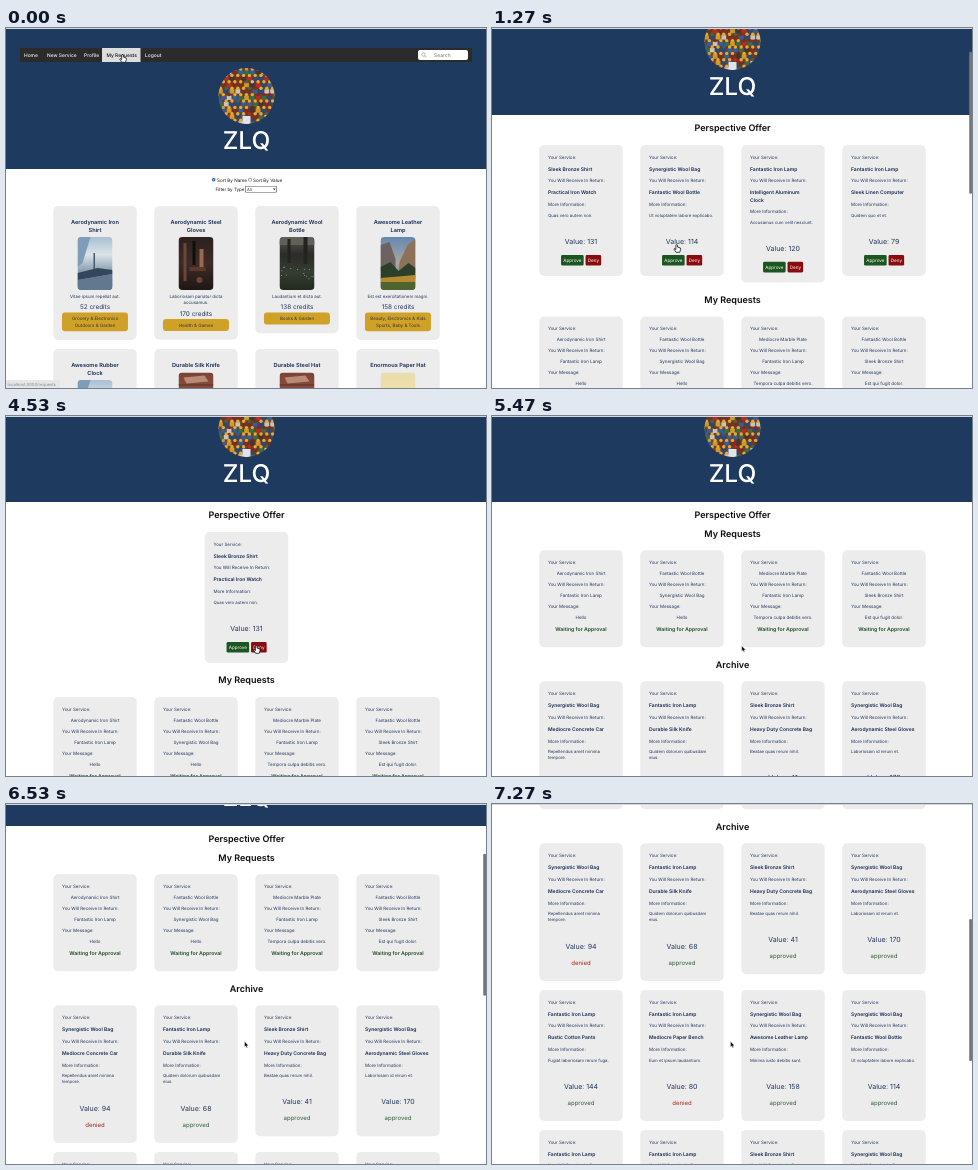
An HTML page with a canvas for the animation above (7340 ms loop, 480 by 360 pixels).

```html
<!DOCTYPE html>
<html lang="en">
<head>
<meta charset="utf-8">
<title>Service exchange</title>
<style>
html, body { margin: 0; width: 100%; height: 100%; overflow: hidden; background: #fff; }
canvas { display: block; width: 480px; height: 360px; }
</style>
</head>
<body>
<canvas id="stage"></canvas>
<script>
const W = 480, H = 360, LOOP = 7340, STEP = 200 / 3;
const canvas = document.getElementById('stage');
const ctx = canvas.getContext('2d');
const dpr = window.devicePixelRatio || 1;
canvas.width = W * dpr;
canvas.height = H * dpr;
ctx.textRendering = 'geometricPrecision';

const NAVY = '#1e3a5f', INK = '#22345c', DARK = '#142850', CARD = '#ececec';
const GREEN = '#1b5520', RED = '#8b0a0f', GOLD = '#d0a127';
const CARD_W = 83.5, PITCH = 101;

// ---------- content ----------
const offer = (give, get, info, value, status) => ({ give, get: [].concat(get), info: [].concat(info), value, status });

const offers = [
  offer('Sleek Bronze Shirt', 'Practical Iron Watch', 'Quas vero autem non.', 131),
  offer('Synergistic Wool Bag', 'Fantastic Wool Bottle', 'Ut voluptatem labore explicabo.', 114),
  offer('Fantastic Iron Lamp', ['Intelligent Aluminum', 'Clock'], 'Accusamus cum velit nesciunt.', 120),
  offer('Fantastic Iron Lamp', 'Sleek Linen Computer', 'Quidem quo et et.', 79)
];

const requests = [
  ['Aerodynamic Iron Shirt', 'Fantastic Iron Lamp', 'Hello'],
  ['Fantastic Wool Bottle', 'Synergistic Wool Bag', 'Hello'],
  ['Mediocre Marble Plate', 'Fantastic Iron Lamp', 'Tempora culpa debitis vero.'],
  ['Fantastic Wool Bottle', 'Sleek Bronze Shirt', 'Est qui fugit dolor.']
];

const archive = [
  [
    offer('Synergistic Wool Bag', 'Mediocre Concrete Car', ['Repellendus amet minima', 'tempore.'], 94, 'denied'),
    offer('Fantastic Iron Lamp', 'Durable Silk Knife', ['Quidem dolorum quibusdam', 'eius.'], 68, 'approved'),
    offer('Sleek Bronze Shirt', 'Heavy Duty Concrete Bag', 'Beatae quas rerum nihil.', 41, 'approved'),
    offer('Synergistic Wool Bag', 'Aerodynamic Steel Gloves', 'Laboriosam id rerum et.', 170, 'approved')
  ],
  [
    offer('Fantastic Iron Lamp', 'Rustic Cotton Pants', 'Fugiat laboriosam rerum fuga.', 144, 'approved'),
    offer('Fantastic Iron Lamp', 'Mediocre Paper Bench', 'Eum et ipsum laudantium.', 80, 'denied'),
    offer('Synergistic Wool Bag', 'Awesome Leather Lamp', 'Minima iusto debitis sunt.', 158, 'approved'),
    offer('Synergistic Wool Bag', 'Fantastic Wool Bottle', 'Ut voluptatem labore explicabo.', 114, 'approved')
  ],
  [
    offer('Fantastic Iron Lamp', 'Practical Iron Watch', 'Quas vero autem non.', 131, 'denied'),
    offer('Fantastic Iron Lamp', 'Sleek Linen Computer', 'Quidem quo et et.', 79, 'denied'),
    offer('Sleek Bronze Shirt', 'Practical Iron Watch', 'Quas vero autem non.', 131, 'denied'),
    offer('Synergistic Wool Bag', 'Fantastic Wool Bottle', 'Ut voluptatem labore explicabo.', 114, 'approved')
  ]
];

const services = [
  { title: ['Aerodynamic Iron', 'Shirt'], pic: carPic, text: ['Vitae ipsum repellat aut.'], cost: 52, tags: ['Grocery & Electronics', 'Outdoors & Garden'] },
  { title: ['Aerodynamic Steel', 'Gloves'], pic: toolPic, text: ['Laboriosam pariatur dicta', 'accusamus.'], cost: 170, tags: ['Health & Games'] },
  { title: ['Aerodynamic Wool', 'Bottle'], pic: meadowPic, text: ['Laudantium et dicta aut.'], cost: 138, tags: ['Books & Garden'] },
  { title: ['Awesome Leather', 'Lamp'], pic: cliffPic, text: ['Est est exercitationem magni.'], cost: 158, tags: ['Beauty, Electronics & Kids', 'Sports, Baby & Tools'] },
  { title: ['Awesome Rubber', 'Clock'], pic: carPic },
  { title: ['Durable Silk Knife'], pic: brickPic },
  { title: ['Durable Steel Hat'], pic: brickPic },
  { title: ['Enormous Paper Hat'], pic: sunPic }
];

// ---------- drawing helpers ----------
function text(str, x, y, size, color = INK, weight = 400, align = 'left') {
  ctx.font = `${weight} ${size}px Inter, "Open Sans", sans-serif`;
  ctx.textAlign = align;
  ctx.textBaseline = 'middle';
  ctx.fillStyle = color;
  ctx.fillText(str, x, y + size * 0.07);
}
const centered = (str, x, y, size, color, weight) => text(str, x, y, size, color, weight, 'center');

function rect(x, y, w, h, color) {
  ctx.fillStyle = color;
  ctx.fillRect(x, y, w, h);
}

function roundPath(x, y, w, h, r) {
  ctx.beginPath();
  ctx.moveTo(x + r, y);
  ctx.arcTo(x + w, y, x + w, y + h, r);
  ctx.arcTo(x + w, y + h, x, y + h, r);
  ctx.arcTo(x, y + h, x, y, r);
  ctx.arcTo(x, y, x + w, y, r);
  ctx.closePath();
}

function box(x, y, w, h, r, color) {
  roundPath(x, y, w, h, r);
  ctx.fillStyle = color;
  ctx.fill();
}

function disc(x, y, r, color) {
  ctx.beginPath();
  ctx.arc(x, y, r, 0, Math.PI * 2);
  ctx.fillStyle = color;
  ctx.fill();
}

function poly(color, ...p) {
  ctx.beginPath();
  for (let i = 0; i < p.length; i += 2) ctx.lineTo(p[i], p[i + 1]);
  ctx.closePath();
  ctx.fillStyle = color;
  ctx.fill();
}

function fade(h, ...colors) {
  const g = ctx.createLinearGradient(0, 0, 0, h);
  colors.forEach((c, i) => g.addColorStop(i / (colors.length - 1), c));
  return g;
}

function random(seed) {
  return () => (seed = (seed * 16807) % 2147483647) / 2147483647;
}

// ---------- pictures, each 35 x 53 ----------
function carPic() {
  rect(0, 0, 35, 53, fade(53, '#a9bfd2', '#dbe4e8', '#8399ad', '#46586c'));
  poly('#7f9cb8', 0, 0, 13, 0, 5, 26, 0, 30);
  poly('#34465c', 0, 36, 20, 31, 35, 33, 35, 37, 0, 43);
  poly('#62788f', 0, 43, 35, 37, 35, 53, 0, 53);
  rect(16, 16, 1.5, 16, '#46596b');
}
function toolPic() {
  rect(0, 0, 35, 53, fade(53, '#2b211e', '#3d2c26', '#1f1715'));
  rect(5, 6, 3, 38, '#6d4634');
  rect(14, 4, 3, 24, '#120e0d');
  rect(21, 12, 4, 18, '#9a6a4f');
  rect(11, 30, 16, 4, '#5b3a2b');
  disc(21, 43, 3, '#6d4431');
}
function meadowPic() {
  rect(0, 0, 35, 53, fade(53, '#56554f', '#2c2b28', '#343d30', '#23291f'));
  rect(0, 0, 35, 8, '#625f58');
  rect(8, 2, 3, 24, '#242320');
  rect(24, 0, 4, 27, '#242320');
  const rnd = random(41);
  for (let i = 0; i < 16; i++) disc(rnd() * 35, 28 + rnd() * 14, 0.5, '#a3a69a');
}
function cliffPic() {
  rect(0, 0, 35, 53, fade(53, '#6787b0', '#a9a8a4', '#586a3a'));
  poly('#6d6260', 0, 8, 9, 5, 15, 22, 15, 34, 0, 34);
  poly('#8d7258', 35, 2, 27, 8, 19, 25, 18, 36, 35, 36);
  poly('#2c3f2b', 0, 30, 10, 25, 18, 34, 28, 26, 35, 31, 35, 42, 0, 42);
  poly('#b58a33', 0, 41, 35, 38, 35, 45, 0, 46);
  rect(0, 45, 35, 8, '#50652d');
}
function brickPic() {
  rect(0, 0, 35, 53, fade(53, '#7c4435', '#8f5240', '#5e3328'));
  poly('#b98a76', 5, 5, 26, 3, 30, 9, 8, 11);
  rect(0, 12, 35, 1, '#5b3128');
}
function sunPic() {
  rect(0, 0, 35, 53, fade(53, '#e9dcae', '#f2e3a6', '#d3b765'));
}

function crowdPic(x, y) {
  ctx.save();
  ctx.beginPath();
  ctx.arc(x, y, 28, 0, Math.PI * 2);
  ctx.clip();
  rect(x - 28, y - 28, 56, 56, '#6b3a2a');
  const rnd = random(977);
  const tones = ['#b92a20', '#2f5f9c', '#7b2e20', '#3c6b45', '#c9c4bb', '#4a342a', '#cf9a2a', '#274a78'];
  for (let row = 0; row < 9; row++) {
    for (let col = 0; col < 11; col++) {
      const px = x - 29 + col * 5.8 + (row % 2) * 2.9, py = y - 27 + row * 6.4;
      rect(px - 2.4, py + 1, 4.8, 4.4, tones[Math.floor(rnd() * 8)]);
      disc(px, py, 1.7, rnd() < 0.7 ? '#dfae36' : tones[Math.floor(rnd() * 8)]);
    }
  }
  rect(x - 4, y + 20, 8, 9, '#dfe4ec');
  ctx.restore();
}

// ---------- page parts ----------
const colX = (i, n = 4) => 240.5 - n * PITCH / 2 + 8.75 + i * PITCH;

function header(hover) {
  rect(0, 0, W, 141, NAVY);
  rect(14, 20, 452, 14, '#2b2b2b');
  if (hover) rect(96, 20, 38.5, 14, '#dddddd');
  [['Home', 18], ['New Service', 41], ['Profile', 78], ['My Requests', 100.5], ['Logout', 139]].forEach(([label, x], i) => {
    const lit = hover && i === 3;
    text(label, x, 27, 4.9, lit ? '#111' : '#f4f4f4', 500);
  });
  box(412, 22, 50, 10, 2, '#fff');
  ctx.strokeStyle = '#8a8a8a';
  ctx.lineWidth = 0.6;
  ctx.beginPath();
  ctx.arc(417.6, 26.6, 1.7, 0, Math.PI * 2);
  ctx.moveTo(418.8, 27.9);
  ctx.lineTo(420.5, 29.6);
  ctx.stroke();
  text('Search', 428, 26.9, 5, '#757575');
  crowdPic(240.5, 68);
  centered('ZLQ', 240.5, 112, 24.5, '#fff', 500);
}

function serviceCard(s, x, y) {
  const mid = x + CARD_W / 2;
  const lines = (s.text || ['']).length, tags = s.tags || [''];
  const picY = y + 23.5 + (s.title.length - 1) * 7.5;
  const badgeY = picY + 68.5 + lines * 6.5 + 0.5;
  const badgeH = 5.5 + tags.length * 6.6;
  box(x, y, CARD_W, badgeY + badgeH + 8.7 - y, 5, CARD);
  s.title.forEach((l, i) => centered(l, mid, y + 16 + i * 8, 5.6, DARK, 600));
  ctx.save();
  ctx.translate(mid - 17.5, picY);
  roundPath(0, 0, 35, 53, 4);
  ctx.clip();
  s.pic();
  ctx.restore();
  if (!s.text) return;
  s.text.forEach((l, i) => centered(l, mid, picY + 59 + i * 6.5, 4.4));
  centered(s.cost + ' credits', mid, picY + 63.3 + lines * 6.5, 6.4);
  box(x + 8.7, badgeY, 66, badgeH, 3, GOLD);
  tags.forEach((l, i) => centered(l, mid, badgeY + 6 + i * 6.5, 4.5, '#33343c'));
}

function radio(x, y, on) {
  disc(x, y, 1.8, on ? '#2460b8' : '#555');
  disc(x, y, on ? 0.6 : 1.3, '#fff');
}

function homePage() {
  radio(207.7, 151.8, true);
  text('Sort By Name', 211, 151.8, 4.6, '#111');
  radio(244, 151.8, false);
  text('Sort By Value', 247, 151.8, 4.6, '#111');
  text('Filter by Type:', 209.5, 161, 4.5, '#111');
  box(239, 158, 32, 6.5, 1, '#555');
  box(239.6, 158.6, 30.8, 5.3, 0.8, '#fff');
  text('All', 241, 161.1, 4, '#222');
  poly('#222', 267, 160.4, 269.6, 160.4, 268.3, 162.3);
  services.forEach((s, i) => serviceCard(s, colX(i % 4), i < 4 ? 178 : 321));
}

const extraLines = o => o.get.length + o.info.length - 2;
const offerHeight = o => 131 + extraLines(o) * 6.6;
const rowHeight = list => list.length ? Math.max(...list.map(offerHeight)) : 0;

function offerCard(o, x, y) {
  const mid = x + CARD_W / 2, left = x + 8.7;
  box(x, y, CARD_W, offerHeight(o), 5, CARD);
  text('Your Service:', left, y + 12, 4.5);
  text(o.give, left, y + 24, 5, DARK, 600);
  text('You Will Receive In Return:', left, y + 35.7, 4.5);
  o.get.forEach((l, i) => text(l, left, y + 47.6 + i * 7.5, 5, DARK, 600));
  const infoY = y + 59.6 + (o.get.length - 1) * 7.2;
  text('More Information:', left, infoY, 4.5);
  o.info.forEach((l, i) => text(l, left, infoY + 10.5 + i * 6.2, 4.3));
  const low = y + extraLines(o) * 6.8;
  centered('Value: ' + o.value, mid, low + 96.3, 7);
  if (o.status) {
    centered(o.status, mid, low + 112.7, 6, o.status === 'denied' ? '#a8201c' : '#2f5e35');
    return;
  }
  box(x + 21.8, low + 110, 22.6, 10.6, 1.4, GREEN);
  centered('Approve', x + 33.1, low + 115.2, 4.6, '#fff');
  box(x + 46.3, low + 110, 15.6, 10.6, 1.4, RED);
  centered('Deny', x + 54.1, low + 115.2, 4.6, '#fff');
}

function requestCard([give, get, note], x, y) {
  const mid = x + CARD_W / 2, left = x + 8.7;
  box(x, y, CARD_W, 97, 5, CARD);
  text('Your Service:', left, y + 12, 4.5);
  centered(give, mid, y + 23, 4.5);
  text('You Will Receive In Return:', left, y + 34, 4.5);
  centered(get, mid, y + 45, 4.5);
  text('Your Message:', left, y + 56, 4.5);
  centered(note, mid, y + 67, 4.5);
  centered('Waiting for Approval', mid, y + 79.2, 5.2, '#1d4a1f', 600);
}

const heading = (str, y) => centered(str, 240.5, y, 9, '#0a0a0a', 600);

function requestsPage(open) {
  heading('Perspective Offer', 154);
  open.forEach((o, i) => offerCard(o, colX(i, open.length), 171));
  let y = open.length ? 171 + rowHeight(open) + 17 : 172.3;
  heading('My Requests', y);
  y += 17;
  requests.forEach((r, i) => requestCard(r, colX(i), y));
  y += 114;
  heading('Archive', y);
  y += 17;
  archive.forEach(row => {
    row.forEach((o, i) => offerCard(o, colX(i), y));
    y += rowHeight(row) + 9;
  });
}

// ---------- pointer ----------
function hand(x, y) {
  ctx.save();
  ctx.translate(x, y);
  ctx.beginPath();
  ctx.moveTo(-0.8, 0.6);
  ctx.quadraticCurveTo(0, -0.6, 0.8, 0.6);
  ctx.lineTo(0.9, 2.6);
  ctx.lineTo(3.6, 3.4);
  ctx.lineTo(3.9, 5);
  ctx.lineTo(3, 7.8);
  ctx.lineTo(-0.6, 7.8);
  ctx.lineTo(-2.8, 4.6);
  ctx.lineTo(-2, 4);
  ctx.lineTo(-0.8, 5);
  ctx.closePath();
  ctx.fillStyle = '#fff';
  ctx.strokeStyle = '#111';
  ctx.lineWidth = 0.8;
  ctx.fill();
  ctx.stroke();
  ctx.restore();
}

function arrow(x, y) {
  ctx.save();
  ctx.translate(x, y);
  ctx.lineJoin = 'round';
  poly('#0a0a0a', 0, 0, 0, 5.6, 1.3, 4.5, 2.2, 6.5, 3.1, 6.1, 2.3, 4.2, 4, 4.1);
  ctx.strokeStyle = '#fff';
  ctx.lineWidth = 0.4;
  ctx.stroke();
  ctx.restore();
}

// ---------- motion ----------
const smooth = k => k * k * (3 - 2 * k);

// keys: [time, ...values]
function track(keys, t, ease = k => k) {
  if (t <= keys[0][0]) return keys[0].slice(1);
  for (let i = 1; i < keys.length; i++) {
    const a = keys[i - 1], b = keys[i];
    if (t < b[0]) {
      const k = ease((t - a[0]) / (b[0] - a[0]));
      return a.slice(1).map((v, j) => v + (b[j + 1] - v) * k);
    }
  }
  return keys[keys.length - 1].slice(1);
}

const pointerKeys = [
  [330, 116.5, 26.5], [800, 184.7, 216.5], [1267, 184.7, 216.5], [1667, 184.5, 221],
  [2130, 184.5, 221], [2600, 251.3, 230], [3270, 251.3, 230], [3533, 300, 230],
  [4000, 300, 230], [4333, 251, 231], [4400, 251, 231], [4533, 250.2, 229.5],
  [5400, 250.2, 229.5], [5933, 238.5, 237.5]
];
const scrollKeys = [[6000, 55], [6200, 70], [6867, 169], [7267, 281]];
const clicks = [[66, 200], [1865, 2000], [2665, 2800], [3730, 3860], [4865, 4995]];
const GONE = [5190, 2065, 2995, 3995];

function scrollAt(t) {
  if (t < 867) return 0;
  if (t < 2995) return 62 * (1 - Math.pow(1 - Math.min(1, (t - 867) / 800), 3));
  return track(scrollKeys, t)[0];
}

function draw(t) {
  // whole-pixel scrolling, as a browser does
  const home = t < 260, scroll = Math.round(scrollAt(t));
  const [px, py] = track(pointerKeys, t, smooth);
  const onNav = t < 390;

  ctx.setTransform(dpr, 0, 0, dpr, 0, 0);
  rect(0, 0, W, H, '#fff');
  ctx.save();
  ctx.translate(0, -scroll);
  header(onNav);
  if (home) homePage();
  else requestsPage(offers.filter((o, i) => t < GONE[i]));
  ctx.restore();
  rect(0, 0, W, 1, '#d3d8de');

  if (onNav) {
    rect(0, 352, 54, 8, '#e4e6e8');
    text('localhost:3000/requests', 1.5, 356, 4.2, '#85898e');
  }

  const bar = t > 6060 ? 1 : t > 860 ? Math.max(0, Math.min(1, (2150 - t) / 250)) : 0;
  if (bar) {
    ctx.globalAlpha = bar;
    box(477.2, 2 + scroll * 0.402, 2.8, 142, 1.3, '#777');
    ctx.globalAlpha = 1;
  }

  if (clicks.some(([a, b]) => t >= a && t < b)) {
    ctx.beginPath();
    ctx.arc(px + 0.2, py + 1.3, 10, 0, Math.PI * 2);
    ctx.strokeStyle = '#0a0a0a';
    ctx.lineWidth = 1.6;
    ctx.stroke();
  }
  if ((t > 390 && t < 790) || t > 5190) arrow(px, py);
  else hand(px, py);
}

const start = performance.now();
function tick() {
  const t = (performance.now() - start) % LOOP;
  draw(Math.floor((t + 4) / STEP) * STEP % LOOP);
  requestAnimationFrame(tick);
}
tick();
</script>
</body>
</html>
```
